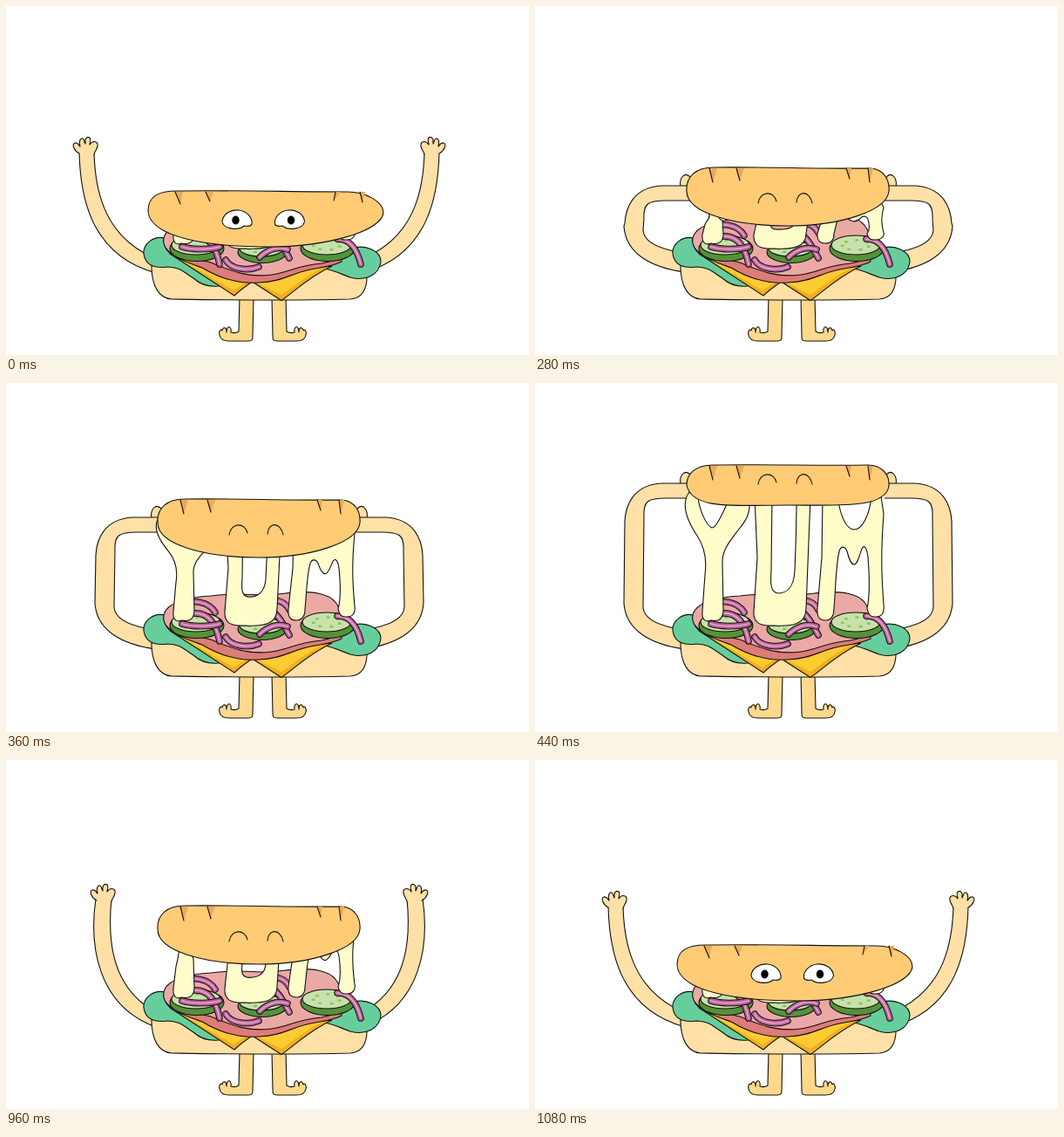
These frames come from a looping animation (600 px wide and 400 px high, 1.2 s). An HTML page:

```html
<!DOCTYPE html>
<html lang="en">
<head>
<meta charset="utf-8">
<title>Stretchy sandwich</title>
<style>
  html, body { margin: 0; width: 100%; height: 100%; overflow: hidden; background: #fff; }
  svg { display: block; width: 600px; height: 400px; }
  path, ellipse { stroke: #111; stroke-width: 1.1; stroke-linejoin: round; stroke-linecap: round; }
  .line { fill: none; }
  .flat { stroke: none; }
</style>
</head>
<body>
<svg viewBox="0 0 600 400">
  <g id="arms"></g>
  <g id="base"></g>
  <g id="melt"></g>
  <g id="top"></g>
</svg>
<script>
const LOOP = 1200;
const SKIN = '#ffe0a6', LEG = '#ffd98c', BUN = '#ffcc75', MELT = '#fffecb';

const layer = id => document.getElementById(id);
const shape = (d, fill, cls = '') => `<path d="${d}" fill="${fill}" class="${cls}"/>`;
const line = d => shape(d, 'none', 'line');
const oval = (x, y, rx, ry, fill, cls = '') =>
  `<ellipse cx="${x}" cy="${y}" rx="${rx}" ry="${ry}" fill="${fill}" class="${cls}"/>`;
const flip = (s, width) => `<g transform="translate(${width} 0) scale(-1 1)">${s}</g>`;
const both = (s, width) => s + flip(s, width);
const mix = (a, b, k) => a + (b - a) * k;
const mapPoints = (d, fn) =>
  d.replace(/(-?[\d.]+),(-?[\d.]+)/g, (_, x, y) => fn(+x, +y).map(n => n.toFixed(2)).join(','));

// ---- still parts ----
function cucumber(x, y, rx, ry) {
  const seeds = [0, 1, 2, 3, 4, 5, 6].map(i => {
    const a = i * 0.9 + 0.3;
    return oval(x + Math.cos(a) * rx * 0.55, y + Math.sin(a) * ry * 0.5, 2.2, 1.3, '#8fbd6c', 'flat');
  }).join('');
  return oval(x + 1, y + 4, rx + 3, ry + 3.5, '#549239') + oval(x, y, rx, ry, '#c6e2a9') + seeds;
}

function onion(d) {
  const stroke = (color, width) =>
    `<path class="line" d="${d}" style="stroke:${color};stroke-width:${width}"/>`;
  return stroke('#111', 7.6) + stroke('#bd5f98', 5.6) + stroke('#e2a5ca', 1.8);
}

function drawBase() {
  const leg = shape('M268,334 L267,373 C264,375 261,375 258,374 C259,369 256,366 254,369 ' +
    'C253,371 253,372 253,374 C253,368 249,367 248,372 C246,369 244,374 245,377 ' +
    'C246,383 251,384 256,384 L278,384 C283,384 283,382 283,378 L284,334', LEG);
  const loaf = shape('M167,298 C167,320 175,335 190,336 C260,337 320,338 395,336 ' +
    'C410,335 415,322 414,304 L380,288 L200,288 Z', SKIN);
  const lettuce = shape('M182,266 C170,263 157,272 158,284 C160,298 172,301 185,299 ' +
    'C200,299 205,306 215,312 C225,321 235,322 244,321 L352,304 C365,296 380,306 395,311 ' +
    'C413,316 428,308 430,293 C430,280 412,274 400,277 L290,262 Z', '#66ce9d');
  const cheese =
    shape('M188,284 L262,332 C268,326 275,321 284,315 L230,296 Z', '#f3ae1d') +
    shape('M188,284 L261,326 L280,314 L230,296 Z', '#ffcb32', 'flat') +
    shape('M284,317 L316,337.5 C330,328 345,312 374,298 L300,306 Z', '#f3ae1d') +
    shape('M285,316 L316,331 C330,322 345,308 366,299 L300,306 Z', '#ffcb32', 'flat');
  const ham =
    shape('M181,268 C180,285 200,291 225,300 C245,312 265,319 290,317 ' +
      'C315,316 325,308 345,303 C360,299 375,299 385,293 L380,262 Z', '#dd7c79') +
    shape('M181,272 C178,255 200,246 235,244 C260,240 280,243 300,243 C320,242 345,236 365,243 ' +
      'C378,247 385,258 385,275 C388,290 375,292 362,295 C335,297 325,305 305,308 ' +
      'C275,312 255,302 235,294 C215,288 185,290 181,272 Z', '#eba9a5');
  const veg = cucumber(218, 274, 28, 11) + cucumber(293, 278, 25, 9) + cucumber(368, 274, 28, 11);
  const rings = [
    'M203,252 C225,247 236,256 240,263',
    'M214,264 C235,262 242,280 245,296',
    'M202,276 C215,280 235,279 245,276',
    'M252,291 C258,302 278,304 290,299',
    'M298,251 C310,247 320,250 325,260',
    'M300,258 C312,264 318,276 325,289',
    'M291,288 C300,279 312,275 323,279',
    'M380,267 C396,267 403,280 407,296'
  ].map(onion).join('');
  layer('base').innerHTML = both(leg, 589) + loaf + lettuce + cheese + ham + veg + rings;
}

// ---- arms ----
const HAND = 'M84,169 C78,166 75,158 79,157 C82,156 84,160 85,161 C83,154 86,151 88,152 ' +
  'C90,153 90,157 91,158 C90,152 93,149 96,151 C98,153 96,157 96,159 ' +
  'C99,154 104,155 105,158 C106,163 102,166 101,170';

// lean: 0 wide apart, 1 pulled inwards
function raisedArm(lean) {
  const wide = [84, 167, 85, 215, 95, 285, 172, 306, 160, 284, 112, 258, 102, 210, 101, 167];
  const near = [122, 151, 106, 205, 112, 278, 172, 306, 160, 279, 130, 247, 131, 200, 141, 151];
  const p = wide.map((n, i) => mix(n, near[i], lean));
  const arm = `M${p.slice(0, 2)} C${p.slice(2, 8)} L${p.slice(8, 10)} C${p.slice(10)}`;
  return shape(arm, SKIN) +
    shape(mapPoints(HAND, (x, y) => [x + 40 * lean, y - 16 * lean]), SKIN);
}

function grippingArm(y) {
  const out = Math.min(y + 35, 255), inn = Math.min(y + 30, 255);
  return shape(`M167,${y - 6} C165,${y - 17} 172,${y - 25} 178,${y - 18} L180,${y}`, SKIN) +
    shape(`M180,${y - 8} L145,${y - 8} C112,${y - 6} 104,${y + 18} 103,${out} L102,252
      C104,285 135,300 172,305 L160,281 C140,277 125,270 124,257 L125,${inn}
      C124,${y + 12} 130,${y + 9} 150,${y + 9} L180,${y + 9}`, SKIN);
}

// ---- melted letters ----
const MELT_Y = 'M177,125 C166,140 176,160 186,175 C196,190 197,205 195,220 L192,262 ' +
  'C191,273 197,274 202,272 C211,274 216,270 216,260 L215,205 C215,190 225,180 232,170 ' +
  'C242,158 248,150 246,130 L222,134 C217,146 208,166 203,166 C197,164 188,145 187,130 Z';
const MELT_U = 'M252,130 L255,200 L251,262 C250,276 260,279 275,278 C295,279 311,277 311,258 ' +
  'L316,130 L300,130 C300,170 299,190 298,215 C297,235 288,241 279,241 ' +
  'C270,240 270,230 271,215 L272,130 Z';
const MELT_M = 'M330,130 L329,200 L324,258 C323,270 328,272 333,272 C341,272 343,266 343,258 ' +
  'C345,235 345,210 349,193 C351,186 356,187 358,193 C361,204 363,208 366,208 ' +
  'C370,208 372,198 375,190 C378,184 381,190 382,200 C384,225 384,245 381,258 ' +
  'C383,269 388,268 391,268 C399,268 401,262 400,254 C397,215 397,190 400,150 L397,130 ' +
  'L386,130 C384,150 376,168 366,168 C356,167 350,150 347,130 Z';

function drawMelt(stretch, spread) {
  const pull = y => y < 262 ? 262 - (262 - y) * stretch : y;
  layer('melt').innerHTML =
    shape(mapPoints(MELT_Y, (x, y) => [y < 200 ? mix(205, x, spread) : x, pull(y)]), MELT) +
    [MELT_U, MELT_M].map(d => shape(mapPoints(d, (x, y) => [x, pull(y)]), MELT)).join('');
}

// ---- top of the loaf, y measured from its upper edge ----
const ROUND = [174, 27, 173, 10, 185, 0, 205, 0, 260, -1, 330, 2, 385, 1,
  400, 2, 407, 14, 406, 27, 404, 50, 350, 67, 290, 67, 230, 67, 174, 53, 174, 27];
const FLAT = [174, 23, 174, 10, 184, 0, 204, 0, 260, -1, 330, 1, 382, 0,
  397, 0, 407, 10, 406, 24, 402, 50, 350, 46, 290, 46, 230, 46, 180, 52, 174, 23];
const WIDE = [163, 23, 163, 6, 175, 0, 196, 0, 260, -1, 330, 1, 392, 1,
  412, 1, 433, 12, 433, 25, 430, 46, 370, 64, 300, 64, 230, 64, 165, 53, 163, 23];

function drawTop(flat, wide, open) {
  const p = ROUND.map((n, i) => n + (FLAT[i] - n) * flat + (WIDE[i] - n) * wide);
  const cuts = [[200, 194, 4, 6, 17, 15], [231, 229, 4, 5, 15, 12],
    [357, 378, 4, -2, 13, 11], [382, 406, 2, 3, 17, 13]];
  const slashes = cuts.map(([x0, x1, dx0, dx1, h0, h1], i) => {
    const x = mix(x0, x1, wide), ex = x + mix(dx0, dx1, wide), ey = mix(h0, h1, wide);
    const side = i < 2 ? 9 : 6;
    return shape(`M${x},1 L${ex},${ey} L${x + side},1 Z`, '#e9a95a', 'flat') +
      line(`M${x},1 L${ex},${ey}`);
  }).join('');
  const eye = shape('M248,35 C249,26 258,21 267,22 C276,23 283,30 282,38 ' +
    'C280,42 276,40 273,40 C268,45 250,45 248,35 Z', '#fff') +
    oval(263.5, 33.5, 4.2, 5, '#000', 'flat');
  const lift = -19 * flat;
  const smile = line(`M256,${41 + lift} c2,-14 18,-15 21,-2`) + line(`M300,${40 + lift} c1,-14 15,-14 18,1`);
  return shape(`M${p.slice(0, 2)} C${p.slice(2)} Z`, BUN) + slashes + (open ? both(eye, 590.5) : smile);
}

// start, top, flat, wide, eyes open, arm lean (null = gripping), stretch, spread
const POSES = [
  [0, 212, 0, 1, true, 0, 0.28, 0.3],
  [120, 214, 0, 0, false, 1, 0.28, 0.3],
  [200, 211, 0, 0, false, null, 0.28, 0.3],
  [280, 185, 0, 0, false, null, 0.28, 0.3],
  [320, 159, 0, 0, false, null, 0.55, 0.7],
  [360, 133, 0, 0, false, null, 0.8, 1],
  [400, 113, 0.5, 0, false, null, 0.9, 1],
  [440, 94, 1, 0, false, null, 1, 1],
  [920, 120, 0, 0, false, 1, 1, 0.75],
  [960, 167, 0, 0, false, 0.5, 0.6, 0.5],
  [1000, 214, 0, 0, false, 0, 0.28, 0.3],
  [1040, 217, 0, 0.5, false, 0, 0.28, 0.3],
  [1080, 212, 0, 1, true, 0, 0.28, 0.3]
];

function drawPose([, top, flat, wide, open, lean, stretch, spread]) {
  const arm = lean === null ? grippingArm(top + 29) : raisedArm(lean);
  layer('arms').innerHTML = both(arm, 581);
  drawMelt(stretch, spread);
  layer('top').setAttribute('transform', `translate(0 ${top})`);
  layer('top').innerHTML = drawTop(flat, wide, open);
}

let shown = null;
const begin = performance.now();
function tick() {
  const t = (performance.now() - begin) % LOOP;
  const pose = POSES.filter(p => p[0] <= t).pop();
  if (pose !== shown) drawPose(shown = pose);
  requestAnimationFrame(tick);
}

drawBase();
tick();
</script>
</body>
</html>
```
